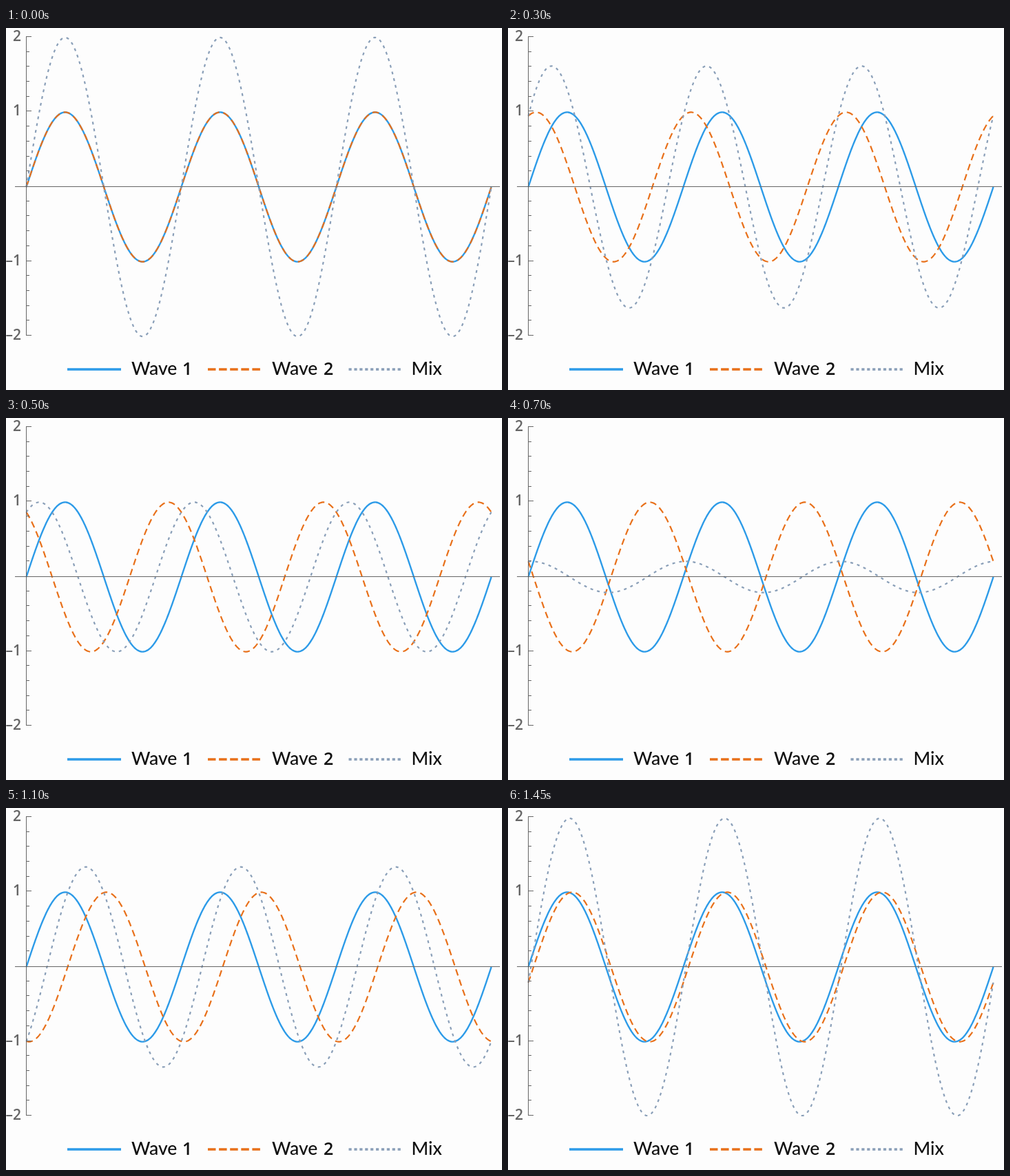
An HTML page with a canvas for the animation above (1500 ms loop, 720x526 px).

```html
<!DOCTYPE html>
<html lang="en">
<head>
<meta charset="utf-8">
<title>Wave interference</title>
<style>
  html, body { margin: 0; width: 100%; height: 100%; overflow: hidden; background: #fdfdfd; }
  canvas { display: block; }
</style>
</head>
<body>
<canvas id="stage" width="720" height="526"></canvas>
<script>
const ctx = document.getElementById('stage').getContext('2d');
const LOOP = 1500, STEP = 50;
const LEFT = 29.5, RIGHT = 704.5, MIDDLE = 231, UNIT = 108.6, WAVELENGTH = 225;
const BLUE = '#2d9be8', ORANGE = '#e8701a', GREY = '#8a9fb8', AXIS = '#666';

function line(points, color, width, dash = []) {
  ctx.beginPath();
  for (const [x, y] of points) ctx.lineTo(x, y);
  ctx.strokeStyle = color;
  ctx.lineWidth = width;
  ctx.setLineDash(dash);
  ctx.stroke();
}

function curve(height, color, width, dash) {
  const points = [];
  for (let x = LEFT; x <= RIGHT; x++) {
    points.push([x, MIDDLE - UNIT * height((x - LEFT) / WAVELENGTH * 2 * Math.PI)]);
  }
  line(points, color, width, dash);
}

function text(string, x, y, font, color = '#111', align = 'left') {
  ctx.font = font;
  ctx.fillStyle = color;
  ctx.textAlign = align;
  ctx.fillText(string, x, y);
}

function axes() {
  line([[13, 230.5], [717, 230.5]], AXIS, 1);
  line([[LEFT, 12], [LEFT, 447]], AXIS, 1);
  for (let i = -10; i <= 10; i++) {
    if (i === 0) continue;
    const y = Math.floor(229.5 - i * UNIT / 5) + 0.5;
    const major = i % 5 === 0;
    line([[LEFT, y], [major ? 37 : 34, y]], AXIS, 1);
    if (major) {
      const label = String(i / 5).replace('-', '–');
      text(label, 22, y + 6.5, '600 21px "Open Sans", sans-serif', AXIS, 'right');
    }
  }
}

function legend() {
  const word = '500 26.5px Lato, sans-serif', digit = '600 25px "Open Sans", sans-serif';
  line([[89, 496], [167, 496]], BLUE, 3.5);
  line([[293, 496], [369, 496]], ORANGE, 3.5, [11.5, 4.6]);
  line([[497.5, 496], [573, 496]], GREY, 3.5, [4.2, 3.7]);
  text('Wave', 182, 504, word);
  text('1', 256, 504, digit);
  text('Wave', 386, 504, word);
  text('2', 461, 504, digit);
  text('Mix', 588.5, 504, word);
}

function draw(now) {
  const phase = Math.floor(now % LOOP / STEP) * STEP / LOOP * 2 * Math.PI;
  ctx.fillStyle = '#fdfdfd';
  ctx.fillRect(0, 0, 720, 526);
  curve(Math.sin, BLUE, 2.4);
  curve(a => Math.sin(a + phase), ORANGE, 2.2, [9.5, 6]);
  curve(a => Math.sin(a) + Math.sin(a + phase), GREY, 2.2, [4, 6]);
  axes();
  legend();
}

const start = performance.now();
function tick() {
  draw(performance.now() - start);
  requestAnimationFrame(tick);
}
tick();
</script>
</body>
</html>
```
